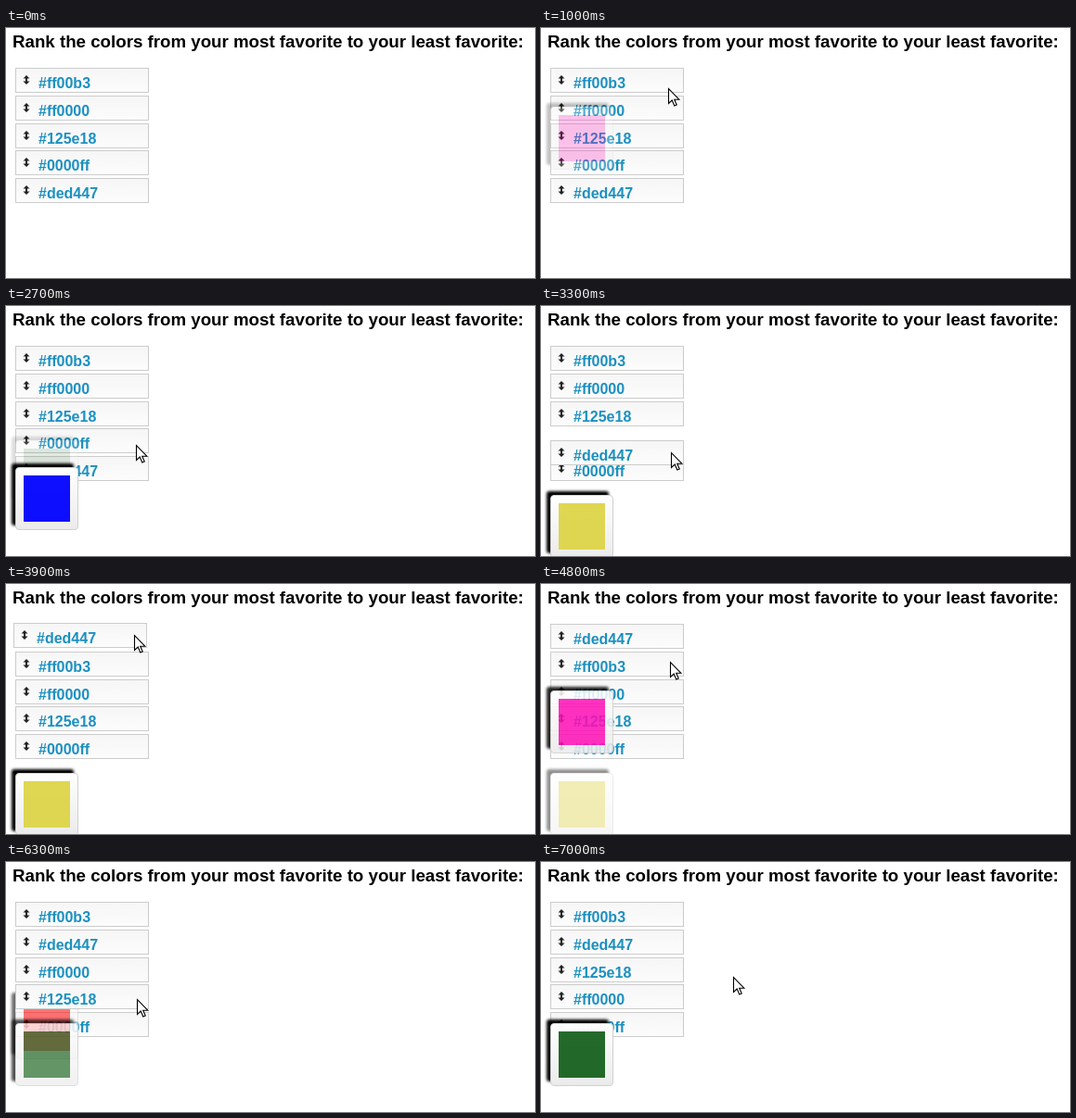
An HTML page for the animation above (7.1 s loop, 570x270 px).

```html
<!DOCTYPE html>
<html lang="en">
<head>
<meta charset="utf-8">
<title>Rank the colors</title>
<style>
  html, body { margin: 0; width: 100%; height: 100%; overflow: hidden; background: #fff; }
  svg { display: block; }
  text { font: bold 16px "Liberation Sans", Arial, sans-serif; fill: #1c90c0; }
  #title { font-size: 18.72px; fill: #000; }
</style>
</head>
<body>
<svg id="stage" width="570" height="270" viewBox="0 0 570 270">
  <defs>
    <linearGradient id="rowFill" x2="0" y2="1">
      <stop offset="0" stop-color="#f6f6f6"/>
      <stop offset="1" stop-color="#fcfcfc"/>
    </linearGradient>
    <linearGradient id="tipFill" x2="0" y2="1">
      <stop offset="0" stop-color="#fff"/>
      <stop offset="1" stop-color="#ebebeb"/>
    </linearGradient>
    <filter id="blur" x="-20%" y="-20%" width="140%" height="140%">
      <feGaussianBlur stdDeviation="1.7"/>
    </filter>
  </defs>
  <text id="title" x="7" y="20.5">Rank the colors from your most favorite to your least favorite:</text>
  <g id="rows"></g>
  <g id="tips"></g>
  <g id="held"></g>
  <path id="cursor" d="M.5 .5V16.5L4.2 13L6.8 19L9.2 18L6.7 12.2H11.8Z" fill="#fff" stroke="#000" stroke-width="1.1"/>
</svg>
<script>
const LOOP = 7100, STEP = 100, FADE_IN = 400, FADE_OUT = 550;
const LEFT = 10, TOP = 43, PITCH = 29.75;
const $ = id => document.getElementById(id);
const colors = ['#ff00b3', '#ff0000', '#125e18', '#0000ff', '#ded447'];

const clamp = (v, lo, hi) => Math.min(hi, Math.max(lo, v));
const swing = k => (1 - Math.cos(Math.PI * clamp(k, 0, 1))) / 2;
const rowTop = i => Math.round(TOP + PITCH * i);

// pointer turns: time, x, y
const path = [
  [100, 553, 260], [500, 260, 128], [1000, 137, 65], [1500, 140, 91],
  [3200, 140, 175], [3900, 138, 55], [4300, 138, 55], [4900, 139, 90],
  [5600, 139, 49], [5800, 139, 115], [6300, 141, 148],
  [6600, 147, 112], [6900, 146, 121], [7000, 207, 124]
];

const drags = [
  { from: 4, start: 3200, end: 4200 },
  { from: 1, start: 4900, end: 5600 },
  { from: 3, start: 6300, end: 6900 }
];

// a steady sweep over all rows, then the rows hovered between drags
const enter = row => 870 + 470 * row;
const visits = [
  ...colors.map((_, row) => ({ row, from: enter(row), to: row < 4 ? enter(row + 1) : 4500 })),
  { row: 2, from: 5750, to: 6050 },
  { row: 1, from: 4500, to: 5750 },
  { row: 3, from: 6050, to: 6950 }
];

function pointer(t) {
  const i = path.findIndex(p => p[0] > t);
  if (i < 1) return path.at(i).slice(1);
  const [t0, x0, y0] = path[i - 1], [t1, x1, y1] = path[i];
  const k = (t - t0) / (t1 - t0);
  return [x0 + (x1 - x0) * k, y0 + (y1 - y0) * k];
}

// order of the list and the row in hand, if any
function listAt(t) {
  const order = [...colors.keys()];
  let held = null;
  for (const { from, start, end } of drags.filter(d => t >= d.start)) {
    const [gx, gy] = pointer(start), [px, py] = pointer(Math.min(t, end));
    const y = rowTop(from) + py - gy;
    const [item] = order.splice(from, 1);
    order.splice(clamp(Math.round((y - TOP) / PITCH), 0, 4), 0, item);
    if (t <= end) held = { item, x: LEFT + px - gx, y };
  }
  return { order, held };
}

function place(el, x, y) {
  el.setAttribute('transform', `translate(${Math.round(x)} ${Math.round(y)})`);
}

function add(parent, markup) {
  const g = document.createElementNS('http://www.w3.org/2000/svg', 'g');
  g.innerHTML = markup;
  return parent.appendChild(g);
}

const rows = colors.map(c => add($('rows'), `
  <rect x=".5" y=".5" width="143" height="26" fill="url(#rowFill)" stroke="#ccc"/>
  <path d="M12 8L15.5 11.5H13V14.5H15.5L12 18L8.5 14.5H11V11.5H8.5Z" fill="#222"/>
  <text x="25" y="22">${c}</text>`));

const tips = visits.map(({ row, from }) => {
  const color = colors[listAt(from).order[row]];
  const g = add($('tips'), `
    <rect x="-4" y="-4" width="67" height="67" rx="3" filter="url(#blur)"/>
    <rect x=".5" y=".5" width="67" height="67" rx="3.5" fill="url(#tipFill)" stroke="#d0d0d0"/>
    <rect x="9" y="9" width="50" height="50" fill="${color}" fill-opacity=".94"/>`);
  place(g, LEFT, rowTop(row) + 42);
  return g;
});

function draw(t) {
  const { order, held } = listAt(t);
  order.forEach((item, i) => {
    const free = held && held.item === item;
    const layer = $(free ? 'held' : 'rows');
    if (rows[item].parentNode !== layer) layer.appendChild(rows[item]);
    if (free) place(rows[item], held.x, held.y);
    else place(rows[item], LEFT, rowTop(i));
  });

  visits.forEach(({ from, to }, i) => {
    const alpha = swing((t - from) / FADE_IN) * (1 - swing((t - to) / FADE_OUT));
    tips[i].setAttribute('opacity', alpha.toFixed(3));
  });

  $('cursor').setAttribute('display', t < path[0][0] ? 'none' : 'inline');
  place($('cursor'), ...pointer(t));
}

const begin = performance.now();
function frame() {
  const t = (performance.now() - begin) % LOOP;
  draw(Math.floor(t / STEP) * STEP);
  requestAnimationFrame(frame);
}
draw(0);
requestAnimationFrame(frame);
</script>
</body>
</html>
```
